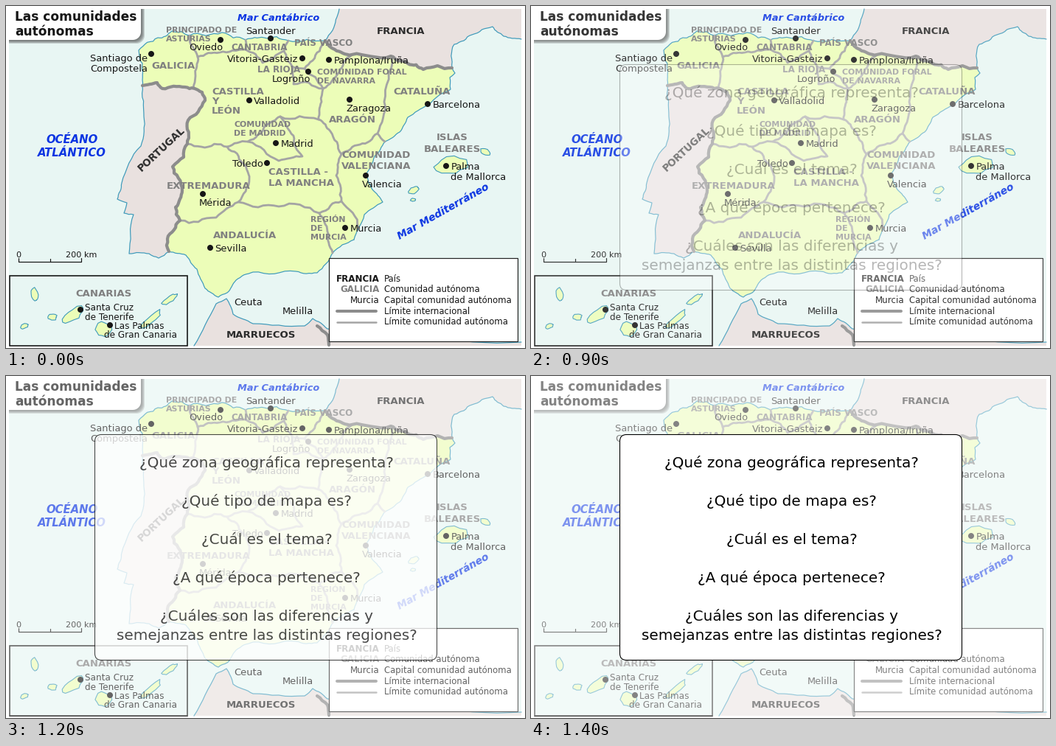
Recreate the animation shown at these times as a matplotlib script. Size 704 by 464 pixels, loop 1900 ms.

```python
import numpy as np
import matplotlib.pyplot as plt
from matplotlib.animation import FuncAnimation
from matplotlib.patches import Circle, FancyBboxPatch, Polygon, Rectangle

W, H, DPI = 704, 464, 64
PT = 72 / DPI  # points per pixel
FRAMES, STEP_MS = 19, 100
FADE_START, FADE_STEPS = 7, 7
VEIL = 0.47

SEA, LAND, ABROAD = "#e8f6f3", "#ecfdb8", "#e9e1df"
COAST, FRONTIER, REGION = "#3f9aba", "#8c8c8c", "#a4a4a4"
GREY, DARK, INK, BLUE = "#808080", "#2b2b2b", "#161616", "#0a34e2"

plt.rcParams["font.family"] = "DejaVu Sans"
rng = np.random.default_rng(7)

fig = plt.figure(figsize=(W / DPI, H / DPI), dpi=DPI, facecolor="white")
ax = fig.add_axes([0, 0, 1, 1])
ax.set_xlim(0, W)
ax.set_ylim(H, 0)
ax.axis("off")


def rough(*points, amp=0.13, passes=3):
    """Join key points by midpoint displacement, like a natural line."""
    pts = np.array(points, float)
    for _ in range(passes):
        out = [pts[0]]
        for a, b in zip(pts[:-1], pts[1:]):
            d = b - a
            if np.hypot(*d) > 5:
                out.append((a + b) / 2 + np.array([-d[1], d[0]]) * rng.uniform(-amp, amp))
            out.append(b)
        pts = np.array(out)
    return pts


def line(pts, color, width, z):
    ax.plot(*np.transpose(pts), color=color, lw=width * PT, zorder=z,
            solid_joinstyle="round", solid_capstyle="round")


def area(color, z, *parts):
    ax.add_patch(Polygon(np.vstack(parts), facecolor=color, edgecolor="none", zorder=z))


def box(x0, y0, x1, y1, fill, edge="none", width=0, z=1):
    return ax.add_patch(Rectangle((x0, y0), x1 - x0, y1 - y0, facecolor=fill,
                                  edgecolor=edge, lw=width * PT, zorder=z))


def label(s, x, y, size, color=INK, z=10, lead=1.15, **kw):
    """Text lines stacked from the first baseline."""
    kw = {"va": "baseline", **kw}
    return [ax.text(x, y + i * lead * size, row, fontsize=size * PT, color=color, zorder=z, **kw)
            for i, row in enumerate(s.split("\n"))]


def region(*points):
    line(rough(*points), REGION, 2.8, 5)


def island(x, y, length, width, tilt=0, z=8):
    """A ragged ellipse, tilted counter-clockwise."""
    t = np.linspace(0, 2 * np.pi, 15)
    r = rng.uniform(0.82, 1.15, t.size)
    r[-1] = r[0]
    u, v = length / 2 * r * np.cos(t), width / 2 * r * np.sin(t)
    c, s = np.cos(np.radians(tilt)), np.sin(np.radians(tilt))
    pts = np.c_[x + u * c + v * s, y - u * s + v * c]
    area(LAND, z, pts)
    line(pts, COAST, 1.1, z + 0.1)


# Where coasts and limits meet
minho, guadiana, bidasoa, creus = (185, 108), (221, 333), (433, 47), (605, 84)
palos, eo, deva, carranza = (472, 317), (249, 40), (325, 46), (383, 47)
ancares, picos, orduna, ebro = (260, 69), (325, 59), (377, 61), (405, 85)
moncayo, jalon, turia, matarranya = (430, 112), (424, 154), (455, 201), (504, 173)
ayllon, gredos, tajo, sierra = (372, 150), (328, 184), (300, 191), (315, 266)
segura, yecla = (425, 281), (455, 265)

north = rough(bidasoa, (383, 47), (350, 43), (325, 46), (293, 36), (249, 40),
              (225, 34), (206, 43), (180, 60), (185, 78), minho)
west = rough(minho, (187, 150), (183, 190), (157, 240), (151, 262), (164, 267),
             (160, 281), (173, 283), (167, 336), (194, 336), (207, 342), guadiana, amp=0.07)
frontier = rough(minho, (205, 104), (212, 112), (243, 110), (266, 117), (270, 128),
                 (247, 155), (246, 187), (241, 205), (226, 218), (239, 250),
                 (230, 273), (236, 291), (219, 316), guadiana)
south = rough(guadiana, (244, 338), (259, 357), (270, 383), (288, 395), (300, 389),
              (312, 372), (335, 361), (393, 360), (422, 362), (443, 335), palos, amp=0.08)
east = rough(palos, (478, 301), (486, 283), (511, 266), (497, 249), (488, 228),
             (500, 204), (514, 184), (534, 171), (545, 151), (573, 134),
             (603, 113), (602, 97), (609, 91), creus, amp=0.07)
pyrenees = rough(creus, (566, 86), (545, 78), (522, 68), (469, 66), (446, 59), bidasoa)
biscay = rough(bidasoa, (443, 33), (452, 4), amp=0.06)
lion = rough((699, 45), (675, 41), (660, 28), (632, 39), (608, 52), creus, amp=0.1)
africa = rough((255, 461), (285, 404), (299, 397), (308, 418), (335, 431),
               (405, 434), (416, 424), (436, 438), (699, 456), amp=0.06)
moulouya = rough((422, 434), (436, 446), (438, 460))

box(4, 4, 699, 461, SEA)
area(ABROAD, 2, west, frontier[::-1])
area(ABROAD, 2, biscay, [(699, 4)], lion, pyrenees)
area(ABROAD, 2, africa, [(699, 461)])
area(LAND, 3, north, frontier, south, east, pyrenees)
for shore in (north, west, south, east, biscay, lion, africa):
    line(shore, COAST, 1.2, 4)
for limit in (frontier, pyrenees, moulouya):
    line(limit, FRONTIER, 4.2, 6)

# Regional limits
region(eo, (254, 56), ancares, (257, 95), (254, 112))
region(ancares, (290, 63), picos, deva)
region(picos, (348, 77), orduna, carranza)
region(orduna, (388, 82), ebro, moncayo)
region(ebro, (416, 74), bidasoa)
region((388, 82), (390, 106), moncayo)
region(moncayo, (452, 90), (469, 66))
region(moncayo, (428, 130), jalon, ayllon)
region(jalon, (440, 170), turia, (480, 188), matarranya)
region((514, 184), matarranya, (513, 130), (522, 68))
region(turia, (448, 230), yecla)
region(ayllon, (352, 162), gredos, tajo, (265, 191), (246, 187))
region(ayllon, (390, 176), (402, 204), (370, 210), gredos)
region(tajo, (322, 214), (330, 234), sierra)
region((236, 291), (285, 287), sierra, (370, 272), segura)
region(segura, (436, 306), (443, 335))
region(segura, (440, 271), yecla, (478, 301))

# Islands and the inset
island(604, 216, 42, 22, 6, z=4)
island(650, 198, 15, 8, -20, z=4)
island(553, 250, 15, 9, 30, z=4)
island(552, 263, 7, 4, z=4)
box(5, 366, 246, 460.5, SEA, "#111111", 1.6, 7)
island(39, 391, 20, 10, -75)
island(25, 434, 11, 7, 20)
island(63, 422, 12, 9)
island(91, 419, 32, 15, 35)
island(132, 439, 21, 20)
island(197, 425, 36, 9, 42)
island(222, 398, 24, 8, 35)

# Regions, countries and seas
bold = dict(weight="bold")
for s, x, y in [("GALICIA", 197, 85), ("CASTILLA\nY\nLEÓN", 279, 119.5), ("CATALUÑA", 525, 120),
                ("ARAGÓN", 438, 158), ("COMUNIDAD\nVALENCIANA", 455, 205.5),
                ("CASTILLA -\nLA MANCHA", 356, 229), ("EXTREMADURA", 218, 248),
                ("ANDALUCÍA", 281, 315), ("CANARIAS", 94, 394.5)]:
    label(s, x, y, 13.3, GREY, lead=1.0 if s.count("\n") > 1 else 1.15, **bold)
label("ISLAS\nBALEARES", 605, 182.5, 13.3, GREY, ha="center", **bold)
for s, x, y in [("PRINCIPADO DE\nASTURIAS", 217, 36), ("COMUNIDAD FORAL\nDE NAVARRA", 422, 93),
                ("COMUNIDAD\nDE MADRID", 309, 164), ("REGIÓN\nDE\nMURCIA", 413, 293)]:
    label(s, x, y, 11.05, GREY, lead=1.1, **bold)
for s, x, y in [("CANTABRIA", 305, 60), ("PAÍS VASCO", 391, 54), ("LA RIOJA", 341, 90)]:
    label(s, x, y, 11.9, GREY, **bold)
label("FRANCIA", 503, 38, 13.2, DARK, **bold)
label("MARRUECOS", 299, 450.5, 13.2, DARK, **bold)
slanted = dict(ha="center", va="center", rotation_mode="anchor", **bold)
label("PORTUGAL", 211, 194, 13.5, DARK, rotation=43, **slanted)

sea_font = dict(color=BLUE, style="italic")
label("OCÉANO\nATLÁNTICO", 89.5, 186.5, 14.9, ha="center", **bold, **sea_font)
label("Mar Cantábrico", 314, 20.5, 12.9, **bold, **sea_font)
label("Mar Mediterráneo", 593, 279, 13.9, rotation=29.5, **slanted, **sea_font)

# Cities: the name keeps a fixed offset from the dot on its side
SIDES = {"E": (6.3, 4.8, "left"), "W": (-5.5, 4.6, "right"), "N": (0, -5.5, "center"),
         "SE": (-5, 16, "left"), "SW": (3.5, 14, "right"), "WSW": (-5, 10, "right")}
for name, x, y, side in [
        ("Santiago de\nCompostela", 197, 65, "WSW"), ("Oviedo", 291, 46, "SW"),
        ("Santander", 359, 44, "N"), ("Vitoria-Gasteiz", 402, 71, "W"),
        ("Pamplona/Iruña", 438, 73, "E"), ("Logroño", 410, 89, "SW"),
        ("Valladolid", 330, 128, "E"), ("Zaragoza", 466, 127, "SE"),
        ("Barcelona", 572, 133, "E"), ("Madrid", 366, 186, "E"),
        ("Toledo", 354, 213, "W"), ("Valencia", 488, 230, "SE"),
        ("Mérida", 267, 255, "SE"), ("Sevilla", 277, 328, "E"),
        ("Murcia", 460, 301, "E"), ("Palma\nde Mallorca", 597, 217, "E"),
        ("Santa Cruz\nde Tenerife", 101, 412, "E"), ("Las Palmas", 141, 433, "E")]:
    dx, dy, ha = SIDES[side]
    inset = x < 250 and y > 366
    rise = 3.5 if inset and "\n" in name else 0
    label(name, x + dx, y + dy - rise, 12 if inset else 13, ha=ha, lead=1.08)
    ax.add_patch(Circle((x, y), 4, facecolor=INK, edgecolor="none", zorder=11))
label("de Gran Canaria", 133, 450, 12)
label("Ceuta", 309, 405.5, 13)
label("Melilla", 375, 418.5, 13)

# Scale bar
label("0", 13, 341, 11.2)
label("200 km", 81, 341, 11.2)
line([(17, 342), (17, 346.5), (102, 346.5), (102, 342)], INK, 1.2, 9)
line([(60, 343), (60, 346)], INK, 1.2, 9)

# Legend
box(438, 342, 694, 455, "white", "#222222", 1.2, 9)
for i, (sample, color, weight, text) in enumerate([
        ("FRANCIA", INK, "bold", "País"),
        ("GALICIA", GREY, "bold", "Comunidad autónoma"),
        ("Murcia", INK, "normal", "Capital comunidad autónoma"),
        ("", INK, "normal", "Límite internacional"),
        ("", INK, "normal", "Límite comunidad autónoma")]):
    y = 373.6 + 14.7 * i
    label(sample, 507, y, 11.9, color, weight=weight, ha="right")
    label(text, 513, y, 11.6)
line([(449, 414), (502, 414)], FRONTIER, 4, 10)
line([(449, 428.5), (502, 428.5)], REGION, 2.5, 10)


# Title plate with a soft shadow
def plate(grow, color, alpha):
    x, y, r = 183 + grow, 46 + grow, 11
    t = np.linspace(0, np.pi / 2, 12)
    corner = np.c_[x - r + r * np.cos(t), y - r + r * np.sin(t)]
    ax.add_patch(Polygon(np.vstack([[(4, 4), (x, 4)], corner, [(4, y)]]),
                         facecolor=color, edgecolor="none", alpha=alpha, zorder=12))


for grow in range(5, 0, -1):
    plate(grow, "#555555", 0.24)
plate(0, "white", 1)
label("Las comunidades\nautónomas", 12, 19.5, 17, INK, 13, lead=1.18, **bold)

# White veil over the map and the question panel
veil = box(4, 4, 699, 461, "white", z=50)
panel = ax.add_patch(FancyBboxPatch(
    (120.5, 79.5), 464, 306, boxstyle="round,pad=0,rounding_size=9",
    facecolor="white", edgecolor="black", lw=1.1 * PT, zorder=60))
questions = label("¿Qué zona geográfica representa?\n\n¿Qué tipo de mapa es?\n\n"
                  "¿Cuál es el tema?\n\n¿A qué época pertenece?\n\n"
                  "¿Cuáles son las diferencias y\nsemejanzas entre las distintas regiones?",
                  353.8, 124, 20, "black", 61, lead=1.3, ha="center")


def draw(i):
    a = min(max(i - FADE_START, 0), FADE_STEPS) / FADE_STEPS
    veil.set_alpha(VEIL * a)
    for part in [panel, *questions]:
        part.set_alpha(a)
    return [veil, panel, *questions]


anim = FuncAnimation(fig, draw, frames=FRAMES, interval=STEP_MS, repeat=True, blit=False)
plt.show()
```
